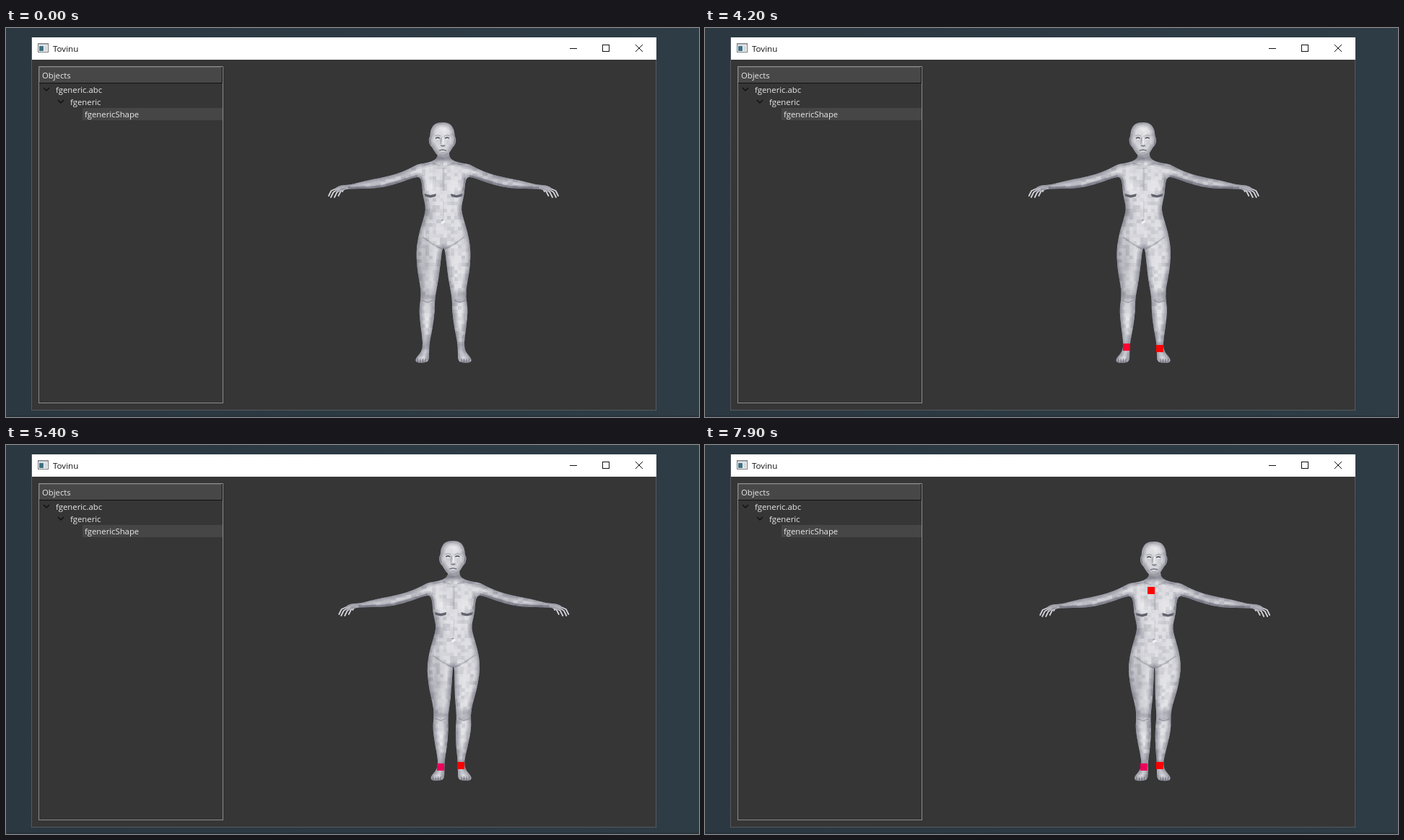
An HTML page with a canvas that plays this animation: 960 by 540 pixels, repeating every 8000 ms.

```html
<!DOCTYPE html>
<html lang="en">
<head>
<meta charset="utf-8">
<title>Mesh viewer</title>
<style>
  html, body { margin: 0; width: 100%; height: 100%; overflow: hidden; background: #2d3a43; }
  svg, canvas { position: absolute; left: 0; top: 0; width: 960px; height: 540px; }
  text { font: 11.3px "Open Sans", "Noto Sans", sans-serif; fill: #e9e9e9; }
  .title { font-size: 11.6px; fill: #111; }
  .line { fill: none; stroke: #111; }
</style>
</head>
<body>
<svg viewBox="0 0 960 540">
  <defs>
    <linearGradient id="desk">
      <stop offset="0" stop-color="#2b3841"/>
      <stop offset="1" stop-color="#2e3c45"/>
    </linearGradient>
  </defs>
  <rect width="960" height="540" fill="url(#desk)"/>
  <rect y="538" width="960" height="2" fill="#27323a"/>
  <rect x="35.5" y="13.5" width="865" height="517" fill="#363637" stroke="#58595b"/>
  <rect x="36" y="13" width="865" height="31" fill="#fff"/>

  <rect x="44.5" y="21.5" width="14" height="12" fill="#f6f6f6" stroke="#777c80"/>
  <rect x="45" y="22" width="13" height="2" fill="#c4c8cb"/>
  <rect x="46" y="25" width="6" height="7" fill="#3f7285"/>
  <rect x="53" y="25" width="4" height="7" fill="#d4dadd"/>
  <text class="title" x="65" y="33">Tovinu</text>
  <g class="line">
    <path d="M781 28.5h10"/>
    <rect x="826.5" y="23.5" width="9" height="9"/>
    <path d="M872 23l10 10m0-10l-10 10"/>
  </g>

  <rect x="45.5" y="53.5" width="255" height="467" fill="none" stroke="#8b8b8b"/>
  <rect x="46" y="54" width="254" height="23" fill="#474747"/>
  <path class="line" d="M46 76.5H299.5V54"/>
  <path class="line" style="stroke:#606060" d="M46.5 75V54.5H298"/>
  <rect x="106" y="111" width="194" height="17" fill="#464646"/>
  <path class="line" stroke-width="1.5" d="M52 83l4 4 4-4M72 100l4 4 4-4"/>
  <text x="50" y="70">Objects</text>
  <text x="69" y="90">fgeneric.abc</text>
  <text x="89" y="107">fgeneric</text>
  <text x="109" y="124">fgenericShape</text>
</svg>
<canvas id="view" width="960" height="540"></canvas>

<script>
const ctx = document.getElementById('view').getContext('2d');
const LOOP = 8000, MID = 606;
const RED = '#ff0000', MAGENTA = '#f000c8';

// Pose keys: time, body x, body y, foot x, marker y
const poseKeys = [
  [4100, 0, 0, 0, 0], [4500, 7.3, 0, 8, 0], [5000, 11.5, 0.6, 15, 2],
  [5400, 14.3, 2, 20, 4], [5800, 16, 2.6, 24.5, 4], [6000, 16.9, 3, 26, 4],
  [6500, 17.2, 3, 26, 4]
];

// Marker steps: time, left, top, colour
const rightSteps = [[200, 629, 442, MAGENTA], [300, 620, 441, MAGENTA], [400, 624, 441, MAGENTA],
  [600, 624, 441, RED], [1400, 626, 440, RED], [1500, 625, 440, RED]];
const leftSteps = [[2000, 573, 451, RED], [2100, 574, 449, RED], [2200, 573, 447, RED], [2300, 574, 445, RED],
  [2500, 579, 440, RED], [2600, 574, 438, RED], [3200, 576, 438, RED], [3300, 577, 438, RED],
  [4200, 577, 438, '#ff0030'], [5000, 577, 438, '#ee005a']];
const chestSteps = [[6700, 646, 218, MAGENTA], [6800, 640, 190, MAGENTA], [6900, 630, 165, MAGENTA],
  [7000, 622, 185, MAGENTA], [7100, 619, 203, MAGENTA], [7300, 620, 194, MAGENTA],
  [7400, 621, 187, MAGENTA], [7700, 622, 186, MAGENTA], [7800, 617, 192, MAGENTA], [7900, 613, 197, RED]];

// Half outline: distance from the centre line, height
const half = [
  [8, 170], [8, 180], [15, 185], [27, 188], [36, 189], [48, 196], [66, 203], [84, 207.5],
  [108, 212], [130, 218], [143, 218], [151, 223], [149, 228], [138, 224], [124, 223],
  [102, 223], [82, 221], [58, 214], [40, 207], [32, 207], [29.5, 218], [29, 230], [26, 242],
  [24.5, 252], [28, 266], [33, 282], [37, 302], [37.5, 318], [36, 338], [32, 358], [31, 373],
  [33.5, 388], [33, 402], [30.5, 422], [28.5, 438], [30, 449], [39, 459], [38, 464], [30, 465],
  [20, 463], [20, 450], [19.5, 437], [15, 416], [12, 392], [12, 375], [7, 350], [4, 325], [2, 308]
];
const mirrored = half.map(([d, y]) => [MID - d, y]).reverse();
const outline = [...half.map(([d, y]) => [MID + d, y]), [MID, 305], ...mirrored];
const head = [[604.5, 130.5], [615, 132.5], [621, 141], [621.5, 151], [623.5, 153], [622.5, 162],
  [619, 165], [614, 174], [608, 179], [601, 179], [595, 174], [590, 165], [586.5, 162],
  [585.5, 153], [587.5, 151], [588, 141], [594, 132.5]];
const fingers = [[160.5, 234], [157.5, 236], [152.5, 236], [147, 234]];

const lerp = (a, b, k) => a + (b - a) * k;
const clamp = k => Math.max(0, Math.min(1, k));
const noise = (a, b) => { const n = Math.sin(a * 12.99 + b * 78.23) * 43758.5; return n - Math.floor(n); };

function poseAt(t) {
  if (t <= poseKeys[0][0]) return poseKeys[0];
  const i = poseKeys.findIndex(key => key[0] > t);
  if (i < 0) return poseKeys[poseKeys.length - 1];
  const a = poseKeys[i - 1], b = poseKeys[i], k = (t - a[0]) / (b[0] - a[0]);
  return a.map((v, n) => lerp(v, b[n], k));
}

let pose;
// The body shifts as a whole; each leg leans towards its own foot.
function warp([x, y]) {
  const [, bodyX, bodyY, footX] = pose;
  const k = clamp((y - 295) / 145);
  const shift = x < MID ? footX * 1.06 : 0;
  return [x + lerp(bodyX, shift, k), y + lerp(bodyY, bodyX / 11, k)];
}

function closedCurve(points) {
  const p = points.map(warp), n = p.length;
  const mid = i => [(p[i % n][0] + p[(i + 1) % n][0]) / 2, (p[i % n][1] + p[(i + 1) % n][1]) / 2];
  const path = new Path2D();
  path.moveTo(...mid(n - 1));
  for (let i = 0; i < n; i++) path.quadraticCurveTo(...p[i], ...mid(i));
  path.closePath();
  return path;
}

function poly(points, fill) {
  ctx.beginPath();
  points.forEach(p => ctx.lineTo(...warp(p)));
  ctx.fillStyle = fill;
  ctx.fill();
}

function line(points, color, width = 1) {
  ctx.beginPath();
  points.forEach(p => ctx.lineTo(...warp(p)));
  ctx.strokeStyle = color;
  ctx.lineWidth = width;
  ctx.stroke();
}

function glow(x, y, rx, ry, rgb, alpha) {
  const [cx, cy] = warp([x, y]);
  ctx.save();
  ctx.translate(cx, cy);
  ctx.scale(rx, ry);
  const g = ctx.createRadialGradient(0, 0, 0, 0, 0, 1);
  g.addColorStop(0, `rgba(${rgb},${alpha})`);
  g.addColorStop(1, `rgba(${rgb},0)`);
  ctx.fillStyle = g;
  ctx.fillRect(-1, -1, 2, 2);
  ctx.restore();
}

function facets(x0, x1, y0, y1, w, h, strength) {
  for (let y = y0; y < y1; y += h)
    for (let x = x0; x < x1; x += w) {
      const n = noise(x, y), tone = n < 0.4 ? '255,255,255' : '70,72,88';
      poly([[x, y], [x + w, y], [x + w, y + h], [x, y + h]], `rgba(${tone},${Math.abs(n - 0.4) * strength})`);
    }
}

// Fill a shape and darken it softly towards its edge.
function solid(path, fill, detail) {
  ctx.fillStyle = fill;
  ctx.fill(path);
  ctx.save();
  ctx.clip(path);
  ctx.strokeStyle = 'rgba(72,74,88,.12)';
  for (const w of [13, 9, 6, 3]) { ctx.lineWidth = w; ctx.stroke(path); }
  detail();
  ctx.restore();
}

const DARK = '62,64,78', LIGHT = '255,255,255';

function bodyDetail() {
  facets(566, 646, 186, 468, 5, 5, 0.26);
  facets(456, 566, 190, 230, 7, 4, 0.28);
  facets(646, 756, 190, 230, 7, 4, 0.28);
  for (const s of [-1, 1]) {
    const at = d => MID + s * d;
    line([[at(36), 206], [at(60), 213], [at(84), 220], [at(106), 222], [at(132), 222]], `rgba(${DARK},.35)`, 4);
    line([[at(5), 191], [at(14), 188], [at(27), 190]], `rgba(${DARK},.25)`);
    glow(at(17), 220, 13, 12, LIGHT, 0.4);
    poly([[at(10), 230], [at(18), 232], [at(27), 230], [at(25), 234], [at(18), 235.5], [at(11), 234]], '#63646d');
    line([[at(30), 208], [at(27), 226]], `rgba(${DARK},.25)`, 2);
    line([[at(29), 290], [at(15), 300], [at(2), 307]], `rgba(${DARK},.22)`, 2);
    glow(at(20), 335, 9, 38, LIGHT, 0.25);
    glow(at(22), 372, 11, 11, DARK, 0.28);
    line([[at(15), 378], [at(22), 381], [at(30), 378]], `rgba(${DARK},.3)`, 1.5);
    glow(at(23), 405, 7, 24, LIGHT, 0.3);
    glow(at(25), 442, 7, 9, DARK, 0.18);
    for (let i = 0; i < 4; i++) line([[at(25 + i * 3.5), 459], [at(25 + i * 3.5), 466]], `rgba(${DARK},.55)`);
  }
  line([[606, 194], [606, 226]], `rgba(${DARK},.14)`, 3);
  glow(607, 247, 14, 14, LIGHT, 0.2);
  line([[606, 240], [606, 264]], `rgba(${DARK},.15)`);
  line([[603, 271], [608, 268]], '#f6f6f8', 2.5);
  line([[603, 267], [606, 266]], '#8a8b94');
  glow(580, 325, 15, 55, DARK, 0.25);
  glow(584, 255, 12, 30, DARK, 0.2);
  glow(605, 181, 15, 7, DARK, 0.6);
}

function headDetail() {
  facets(585, 625, 130, 180, 5, 4, 0.14);
  glow(606, 142, 14, 11, LIGHT, 0.45);
  for (const x of [598, 611]) {
    line([[x - 4, 150], [x, 148.5], [x + 4, 150]], `rgba(${DARK},.4)`);
    line([[x - 3, 153], [x, 152], [x + 3, 153]], '#50515c', 1.5);
    line([[x - 2, 154.5], [x + 2, 154.5]], '#eeeef2');
  }
  line([[603, 152], [602, 161]], `rgba(${DARK},.4)`);
  line([[605.5, 152], [605.5, 161]], '#f4f4f7', 1.5);
  line([[602, 163], [605, 164], [608, 163]], '#777883', 1.5);
  line([[600, 170], [605, 169], [610, 170]], '#767781', 1.4);
  line([[602, 173], [608, 173]], `rgba(${DARK},.35)`);
  line([[587, 153], [588.5, 162]], '#72737e');
  line([[622, 153], [620.5, 162]], '#72737e');
}

function drawFigure() {
  ctx.lineCap = ctx.lineJoin = 'round';
  for (const s of [-1, 1]) {
    for (const [d, y] of fingers)
      line([[MID + s * (d - 14), 222], [MID + s * (d - 5), y - 8], [MID + s * (d - 1.5), y - 1]], '#d3d3d9', 1.8);
    line([[MID + s * 137, 221], [MID + s * 140, 227]], '#c5c5cc', 2);
  }
  ctx.lineCap = 'butt';
  solid(closedCurve(outline), '#dcdce1', bodyDetail);
  solid(closedCurve(head), '#d6d6db', headDetail);
}

function drawMarker(steps, t, dx = 0, dy = 0) {
  const step = steps.filter(s => s[0] <= t).pop();
  if (!step) return;
  ctx.fillStyle = step[3];
  ctx.fillRect(Math.round(step[1] + dx), Math.round(step[2] + dy), 10, 10);
}

const start = performance.now();
function render() {
  const t = Math.floor(((performance.now() - start) % LOOP) / 100) * 100;
  pose = poseAt(t);
  ctx.clearRect(0, 0, 960, 540);
  drawFigure();
  drawMarker(rightSteps, t);
  drawMarker(leftSteps, t, pose[3], pose[4]);
  drawMarker(chestSteps, t);
  requestAnimationFrame(render);
}
render();
</script>
</body>
</html>
```
